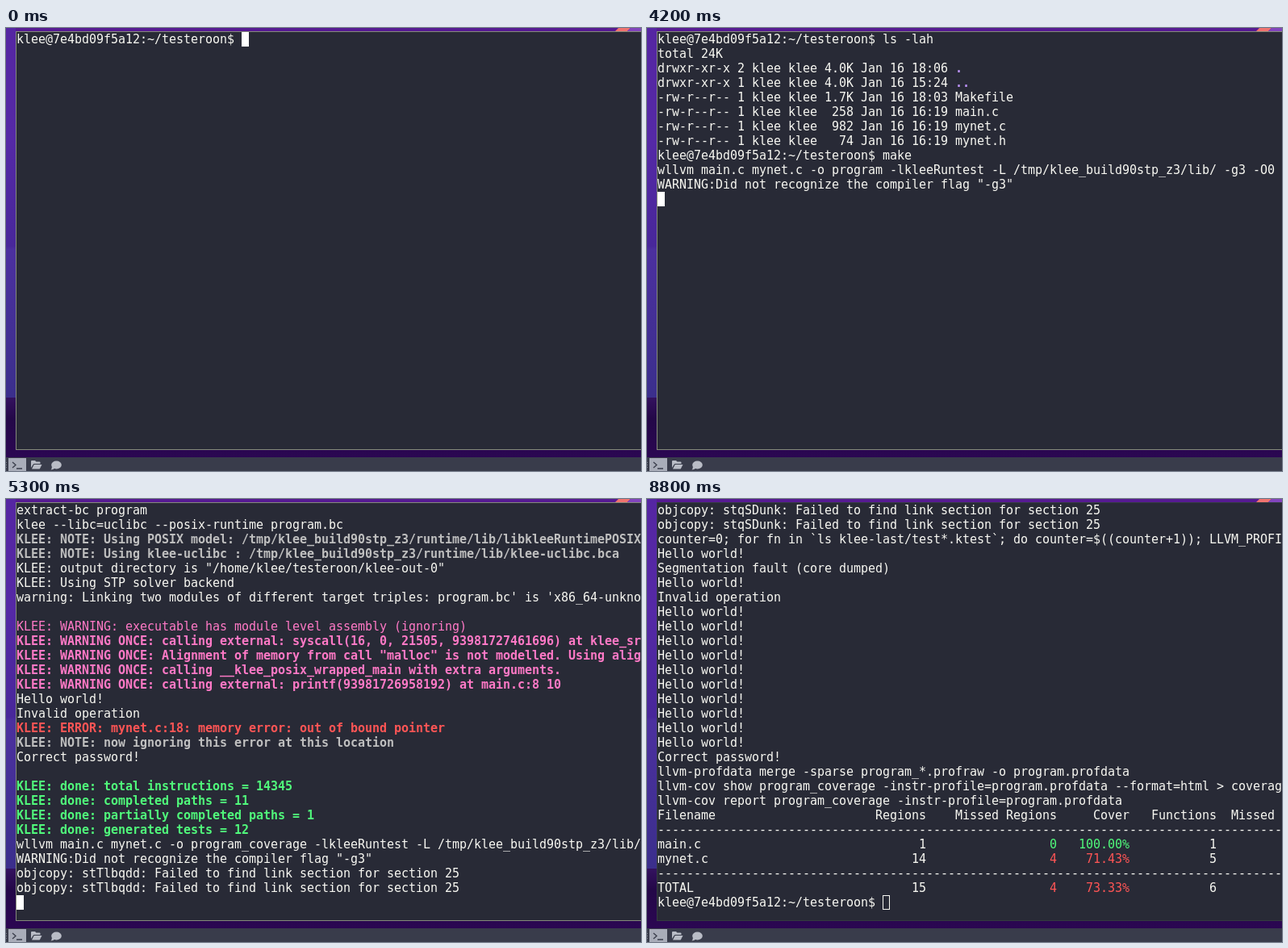
An HTML page that plays this animation: 787 px wide and 549 px high, repeating every 9400 ms.

```html
<!DOCTYPE html>
<html lang="en">
<head>
<meta charset="utf-8">
<title>Terminal session</title>
<style>
html, body { margin: 0; width: 100%; height: 100%; overflow: hidden; background: #2b0752; }
#stage { position: relative; width: 787px; height: 549px; overflow: hidden; }
svg { position: absolute; left: 0; top: 0; }
#terminal {
  position: absolute; left: 12px; top: 4px; width: 790px; height: 517px;
  overflow: hidden; border: 1px solid #858a7b; background: #282a36;
}
#terminal.blurred { border-color: #343c40; }
pre {
  margin: 0; color: #f8f8f2;
  font: 15px/18px "DejaVu Sans Mono", monospace;
  letter-spacing: calc(9px - 1ch); /* nine-pixel character grid */
  font-variant-ligatures: none;
}
.gray { color: #bfbfbf; }
.pink { color: #ff79c6; }
.red { color: #ff5555; }
.green { color: #50fa7b; }
.blue { color: #bd93f9; }
#cursor { position: absolute; box-sizing: border-box; width: 9px; height: 18px; background: #fff; }
.blurred #cursor { background: none; border: 1px solid #f8f8f2; }
</style>
</head>
<body>
<div id="stage">
  <svg width="787" height="549">
    <defs>
      <linearGradient id="sky" x2="0" y2="1">
        <stop offset="0" stop-color="#5526a2"/>
        <stop offset=".3" stop-color="#5529a6"/>
        <stop offset=".59" stop-color="#48279a"/>
        <stop offset=".6" stop-color="#4c309f"/>
        <stop offset="1" stop-color="#3b2f8c"/>
      </linearGradient>
      <linearGradient id="ground" x2="0" y2="1">
        <stop offset="0" stop-color="#34125f"/>
        <stop offset=".35" stop-color="#240848"/>
        <stop offset="1" stop-color="#2b0752"/>
      </linearGradient>
    </defs>
    <rect width="787" height="458" fill="url(#sky)"/>
    <rect y="458" width="787" height="74" fill="url(#ground)"/>
    <rect x="12" width="775" height="4" fill="#561a92"/>
    <path d="M759 0h15l-4 4h-15z" fill="#f0736f"/>
    <path d="M774 0h13v4h-17z" fill="#8245bd"/>
    <rect y="532" width="787" height="17" fill="#393c4b"/>
    <path d="M.5 538v8" stroke="#777b88" stroke-dasharray="1 2"/>
    <rect x="3" y="533" width="22" height="16" fill="#a9adb9"/>
    <path d="M8 538l4 3.5-4 3.500M13 546h7" fill="none" stroke="#393c4b" stroke-width="1.3"/>
    <g fill="#b9bcc6">
      <path d="M31 545v-8q0-1 1-1h4l1.500 1.500h4q1 0 1 1v1.500h-7.500q-1 0-1.500 1z"/>
      <path d="M32 546.500l2.500-5q.3-.5 1-.5h9l-2.500 5q-.3.5-1 .5z"/>
      <ellipse cx="62.500" cy="541.500" rx="6.300" ry="5"/>
      <path d="M57 543q0 3-1.500 4.500 3 0 5-2z"/>
    </g>
  </svg>
  <div id="terminal"><pre id="screen"></pre><div id="cursor"></div></div>
</div>
<script>
const DURATION = 9400, ROWS = 28;
const PROMPT = 'klee@7e4bd09f5a12:~/testeroon$ ';

const color = (name, text) => `<span class="${name}">${text}</span>`;
const bold = (name, text) => `<b class="${name}">${text}</b>`;
const note = text => bold('gray', 'KLEE: NOTE: ' + text);
const once = text => bold('pink', 'KLEE: WARNING ONCE: ' + text);
const done = text => bold('green', 'KLEE: done: ' + text);
const repeat = (count, line) => Array(count).fill(line);
const linkFailure = (id, section) =>
  repeat(2, `objcopy: ${id}: Failed to find link section for section ${section}`);
const file = (size, time, name) => `-rw-r--r-- 1 klee klee ${size.padStart(4)} Jan 16 ${time} ${name}`;
const coverage = (name, regions, missed, cover, functions, tone) =>
  name.padEnd(30) + regions.padStart(7) + color(tone, missed.padStart(18) + cover.padStart(10)) +
  functions.padStart(12);

const flagWarning = 'WARNING:Did not recognize the compiler flag "-g3"';
const hello = 'Hello world!';
const rule = '-'.repeat(90);

const lines = [
  PROMPT + 'ls -lah',
  'total 24K',
  'drwxr-xr-x 2 klee klee 4.0K Jan 16 18:06 ' + bold('blue', '.'),
  'drwxr-xr-x 1 klee klee 4.0K Jan 16 15:24 ' + bold('blue', '..'),
  file('1.7K', '18:03', 'Makefile'),
  file('258', '16:19', 'main.c'),
  file('982', '16:19', 'mynet.c'),
  file('74', '16:19', 'mynet.h'),
  PROMPT + 'make',
  'wllvm main.c mynet.c -o program -lkleeRuntest -L /tmp/klee_build90stp_z3/lib/ -g3 -O0',
  flagWarning,
  ...linkFailure('stxU5yAc', 15),
  ...linkFailure('st6PKtqn', 15),
  'extract-bc program',
  'klee --libc=uclibc --posix-runtime program.bc',
  note('Using POSIX model: /tmp/klee_build90stp_z3/runtime/lib/libkleeRuntimePOSIX'),
  note('Using klee-uclibc : /tmp/klee_build90stp_z3/runtime/lib/klee-uclibc.bca'),
  'KLEE: output directory is "/home/klee/testeroon/klee-out-0"',
  'KLEE: Using STP solver backend',
  "warning: Linking two modules of different target triples: program.bc' is 'x86_64-unkno",
  '',
  color('pink', 'KLEE: WARNING: executable has module level assembly (ignoring)'),
  once('calling external: syscall(16, 0, 21505, 93981727461696) at klee_sr'),
  once('Alignment of memory from call "malloc" is not modelled. Using alig'),
  once('calling __klee_posix_wrapped_main with extra arguments.'),
  once('calling external: printf(93981726958192) at main.c:8 10'),
  hello,
  'Invalid operation',
  bold('red', 'KLEE: ERROR: mynet.c:18: memory error: out of bound pointer'),
  note('now ignoring this error at this location'),
  'Correct password!',
  '',
  done('total instructions = 14345'),
  done('completed paths = 11'),
  done('partially completed paths = 1'),
  done('generated tests = 12'),
  'wllvm main.c mynet.c -o program_coverage -lkleeRuntest -L /tmp/klee_build90stp_z3/lib/',
  flagWarning,
  ...linkFailure('stTlbqdd', 25),
  ...linkFailure('stqSDunk', 25),
  'counter=0; for fn in `ls klee-last/test*.ktest`; do counter=$((counter+1)); LLVM_PROFI',
  hello,
  'Segmentation fault (core dumped)',
  hello,
  'Invalid operation',
  ...repeat(10, hello),
  'Correct password!',
  'llvm-profdata merge -sparse program_*.profraw -o program.profdata',
  'llvm-cov show program_coverage -instr-profile=program.profdata --format=html &gt; coverag',
  'llvm-cov report program_coverage -instr-profile=program.profdata',
  'Filename'.padEnd(30) + 'Regions    Missed Regions     Cover   Functions  Missed',
  rule,
  coverage('main.c', '1', '0', '100.00%', '1', 'green'),
  coverage('mynet.c', '14', '4', '71.43%', '5', 'red'),
  rule,
  coverage('TOTAL', '15', '4', '73.33%', '6', 'red'),
];

// Start time, finished lines, text on the line being typed
const steps = [
  [0, 0, PROMPT],
  [400, 0, PROMPT + 'l'],
  [500, 0, PROMPT + 'ls '],
  [800, 0, PROMPT + 'ls -'],
  [900, 0, PROMPT + 'ls -la'],
  [1100, 0, PROMPT + 'ls -lah'],
  [1300, 8, PROMPT],
  [2500, 8, PROMPT + 'm'],
  [2600, 8, PROMPT + 'ma'],
  [2700, 8, PROMPT + 'mak'],
  [2800, 8, PROMPT + 'make'],
  [4200, 11, ''],
  [4400, 13, ''],
  [4500, 16, ''],
  [4600, 18, ''],
  [4800, 21, ''],
  [4900, 28, ''],
  [5000, 33, ''],
  [5100, 40, ''],
  [5300, 42, ''],
  [5400, 47, ''],
  [5500, lines.length, PROMPT],
];
const focusToggles = [7600, 8200, 8300, 8400, 8500, 8700, 8800];

const [terminal, screen, cursor] =
  ['terminal', 'screen', 'cursor'].map(id => document.getElementById(id));
let shown;

function draw() {
  const time = performance.now() % DURATION;
  const step = steps.findLast(([start]) => start <= time);
  if (step !== shown) {
    shown = step;
    const [, count, typed] = step;
    const top = Math.max(0, count + 1 - ROWS);
    screen.innerHTML = [...lines.slice(top, count), typed].join('\n');
    cursor.style.left = typed.length * 9 + 'px';
    cursor.style.top = (count - top) * 18 + 'px';
  }
  const toggles = focusToggles.filter(start => start <= time).length;
  terminal.classList.toggle('blurred', toggles % 2 === 1);
  requestAnimationFrame(draw);
}
draw();
</script>
</body>
</html>
```
